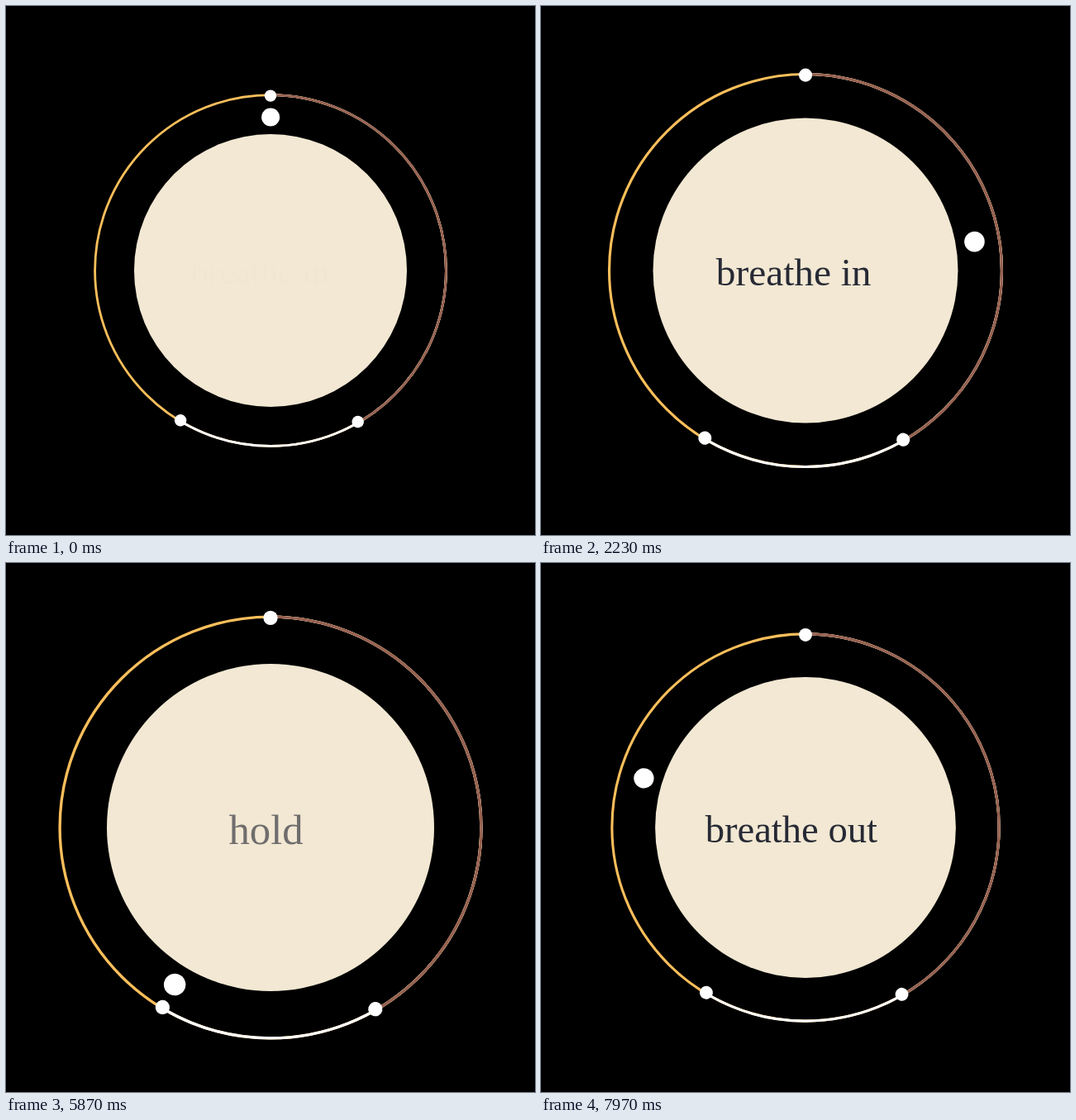
An HTML page that plays this animation: 640 by 640 pixels, repeating every 8 s.

```html
<!DOCTYPE html>
<html lang="en">
<head>
<meta charset="utf-8">
<title>Breathing guide</title>
<style>
  html, body { margin: 0; width: 100%; height: 100%; overflow: hidden; background: #000; }
  svg { display: block; width: 100vw; height: 100vh; }
  text { font: 42.3px "Liberation Serif", "Times New Roman", serif; fill: #272a35; }
  .ring { fill: none; stroke-width: 2.8; }
</style>
</head>
<body>
<svg viewBox="-320 -320 640 640">
  <g id="scene">
    <g transform="rotate(-90)">
      <circle class="ring" r="212.4" stroke="#fdbf5b" pathLength="360"/>
      <circle class="ring" r="212.4" stroke="#fff" pathLength="360" stroke-dasharray="210 150"/>
      <circle class="ring" r="212.4" stroke="#96604f" pathLength="360" stroke-dasharray="150 210"/>
    </g>
    <circle r="165" fill="#f2e8d3"/>
    <g fill="#fff">
      <circle cy="-211.4" r="7.2"/>
      <circle cy="-211.4" r="7.2" transform="rotate(150)"/>
      <circle cy="-211.4" r="7.2" transform="rotate(211)"/>
      <circle id="pointer" cy="-185.5" r="11"/>
    </g>
    <text id="label" y="16.3"></text>
  </g>
</svg>
<script>
  const LOOP = 8000, CYCLE = 10000, FADE = 200, GROWTH = 0.2;
  const phases = [
    { text: "breathe in", x: -96.8, start: 0, end: 4000, size: easeInOut },
    { text: "hold", x: -42.1, start: 4000, end: 6000, size: () => 1 },
    { text: "breathe out", x: -110.1, start: 6000, end: 10000, size: p => 1 - easeInOut(p) }
  ];
  const [scene, pointer, label] =
    ["scene", "pointer", "label"].map(id => document.getElementById(id));

  function easeInOut(p) {
    return (1 - Math.cos(Math.PI * p)) / 2;
  }

  function draw(now) {
    const t = now % LOOP;
    const phase = phases.find(p => t < p.end);
    const progress = (t - phase.start) / (phase.end - phase.start);

    scene.setAttribute("transform", `scale(${1 + GROWTH * phase.size(progress)})`);
    pointer.setAttribute("transform", `rotate(${360 * t / CYCLE})`);

    if (label.textContent !== phase.text) label.textContent = phase.text;
    label.setAttribute("x", phase.x);
    label.setAttribute("opacity", Math.min(1, (t - phase.start) / FADE, (phase.end - t) / FADE));
  }

  const begin = performance.now();
  function tick() {
    draw(performance.now() - begin);
    requestAnimationFrame(tick);
  }
  tick();
</script>
</body>
</html>
```
